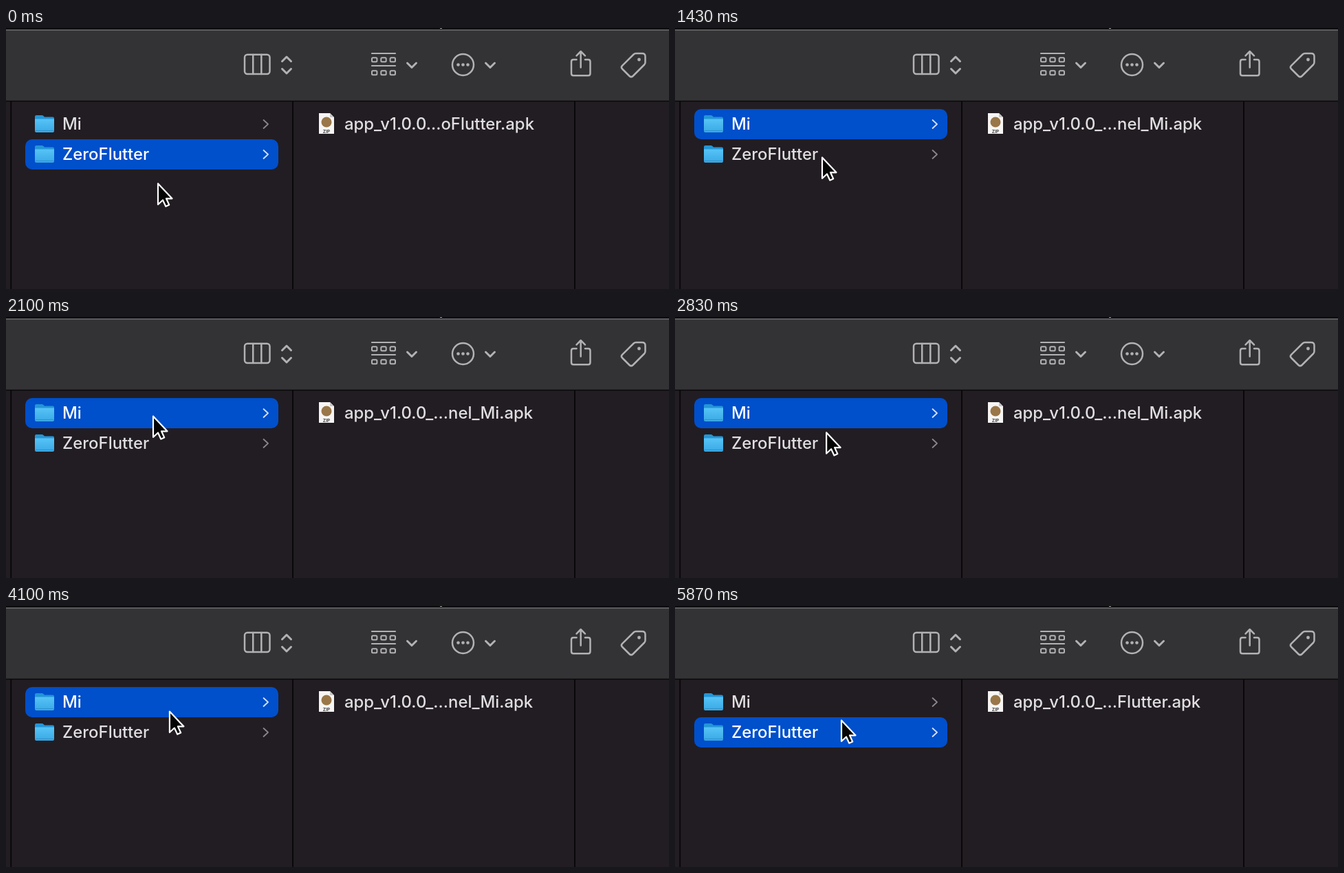
An HTML page that plays this animation: 964x380 px, repeating every 5910 ms.

```html
<!DOCTYPE html>
<html lang="en">
<head>
<meta charset="utf-8">
<title>File browser</title>
<style>
html, body { margin: 0; width: 100%; height: 100%; overflow: hidden; background: #221d22; }
svg { display: block; }
text { font: 500 23.9px Inter, Roboto, sans-serif; fill: #dfdee0; }
.icons { fill: none; stroke: #b2b1b3; stroke-width: 2.5; stroke-linecap: round; stroke-linejoin: round; }
.solid { fill: #b2b1b3; stroke: none; }
.arrow { fill: none; stroke: #89878b; stroke-width: 1.8; stroke-linecap: round; stroke-linejoin: round; }
.on text { fill: #fff; }
.on .arrow { stroke: #d3e2fb; }
.bar { fill: none; }
.on .bar { fill: #004fcb; }
</style>
</head>
<body>
<svg width="964" height="380" viewBox="0 0 964 380">
  <defs>
    <linearGradient id="front" x2="0" y2="1">
      <stop stop-color="#56c4f6"/><stop offset="1" stop-color="#3aa8e5"/>
    </linearGradient>
    <g id="folder">
      <path d="M42 129q0-2 2-2h8q1.500 0 2.500 1l1.500 1.500h12q2 0 2 2V148H42Z" fill="#2496d6"/>
      <path d="M42 132.500h28V150q0 2-2 2H44q-2 0-2-2Z" fill="url(#front)"/>
      <path d="M42.500 149.500h27" stroke="#2b94d0"/>
    </g>
  </defs>

  <rect width="964" height="380" fill="#221d22"/>
  <rect width="964" height="107" fill="#333234"/>
  <rect width="964" height="2" fill="#0d0c0e"/>
  <rect y="2" width="964" height="2" fill="#5c5b5d"/>
  <rect x="631" width="3" height="1" fill="#aaa"/>
  <path d="M0 106.500H964" stroke="#09080a" stroke-width="1.600"/>
  <path d="M7.300 107V380M417 107V380M827 107V380" stroke="#070608" stroke-width="1.800"/>

  <g class="icons">
    <rect x="347" y="38.800" width="36.500" height="28.200" rx="4"/>
    <path d="M359.200 39V67M371.300 39V67"/>
    <path d="M401.500 48.500 408 42l6.500 6.500M401.500 59.500 408 66l6.500-6.500" stroke-width="3"/>
    <path d="M532 37H566M532 55H566" stroke-width="2.200"/>
    <g id="cells" stroke-width="2"></g>
    <path d="M583.500 51 590 57.500 596.500 51M697.500 51 704 57.500 710.500 51" stroke-width="3"/>
    <circle cx="664.500" cy="53.500" r="15.500"/>
    <g class="solid">
      <circle cx="657.500" cy="53.500" r="2.300"/>
      <circle cx="664.500" cy="53.500" r="2.300"/>
      <circle cx="671.500" cy="53.500" r="2.300"/>
    </g>
    <path d="M829.500 46H825q-3 0-3 3V66.300q0 3 3 3H846.500q3 0 3-3V49q0-3-3-3H842M835.700 57.500V34.500M829.500 40.300 835.700 34 842 40.300"/>
    <path d="M912.500 38.500Q914 37 916 37H925Q929.500 37 929.500 41.500V50Q929.500 52 928 53.500L911.500 70Q909 72.300 906.500 70L896 59.500Q893.700 57 896 54.800Z"/>
    <circle class="solid" cx="920.500" cy="46" r="2.400"/>
  </g>

  <g id="mi">
    <rect class="bar" x="28" y="118" width="368" height="44" rx="10"/>
    <use href="#folder"/>
    <text x="82" y="148">Mi</text>
    <path class="arrow" d="M374.500 134 381 140l-6.500 6"/>
  </g>
  <g id="zero">
    <rect class="bar" x="28" y="162" width="368" height="44" rx="10"/>
    <use href="#folder" y="44"/>
    <text x="82" y="192">ZeroFlutter</text>
    <path class="arrow" d="M374.500 178 381 184l-6.500 6"/>
  </g>

  <path d="M455 124H471l6 6V154H455Z" fill="#f6f5f4"/>
  <path d="M471 124v6h6Z" fill="#c8c6c6"/>
  <circle cx="466" cy="137" r="7.500" fill="#9a7748"/>
  <text x="466" y="152.500" text-anchor="middle" style="font-size:6.500px;font-weight:700;fill:#444">ZIP</text>
  <text id="file" x="492" y="148"></text>

  <path id="cursor" d="M0 1.500V32L7 25.500 11.300 34.700 16.200 32.500 12 23.300H20.500Z" fill="#050505" stroke="#fff" stroke-width="2.200" stroke-linejoin="round"/>
</svg>
<script>
const LOOP = 5910;
const $ = id => document.getElementById(id);

// Cursor tip: time, x, y
const path = [
  [0, 221, 225], [30, 221, 225], [560, 200, 150], [1000, 200, 150],
  [1390, 214, 187], [1690, 214, 187], [1970, 214, 143], [2570, 214, 143],
  [2950, 222, 174], [3170, 222, 174], [3420, 230, 127], [3870, 230, 127],
  [4250, 242, 165], [LOOP, 242, 165]
];
// Start time, selected folder, file shown
const picks = [
  [0, 'zero', 'app_v1.0.0…oFlutter.apk'],
  [820, 'mi', 'app_v1.0.0_…nel_Mi.apk'],
  [1540, 'zero', 'app_v1.0.0_…Flutter.apk'],
  [2040, 'mi', 'app_v1.0.0_…nel_Mi.apk'],
  [3030, 'zero', 'app_v1.0.0_…Flutter.apk'],
  [3450, 'mi', 'app_v1.0.0_…nel_Mi.apk'],
  [4340, 'zero', 'app_v1.0.0_…Flutter.apk']
];

for (const y of [43.3, 62.3])
  for (const x of [532, 545.3, 558.6])
    $('cells').innerHTML += `<rect x="${x}" y="${y}" width="7.400" height="6" rx="1.500"/>`;

function draw(now) {
  const t = now % LOOP;
  const i = path.findIndex(p => p[0] > t);
  const [t0, x0, y0] = path[i - 1], [t1, x1, y1] = path[i];
  const u = (t - t0) / (t1 - t0), e = u * u * (3 - 2 * u);
  $('cursor').setAttribute('transform', `translate(${x0 + (x1 - x0) * e} ${y0 + (y1 - y0) * e})`);

  const [, folder, file] = picks.filter(p => p[0] <= t).pop();
  for (const id of ['mi', 'zero']) $(id).classList.toggle('on', id === folder);
  $('file').textContent = file;
}

function tick() {
  draw(performance.now());
  requestAnimationFrame(tick);
}
tick();
</script>
</body>
</html>
```
